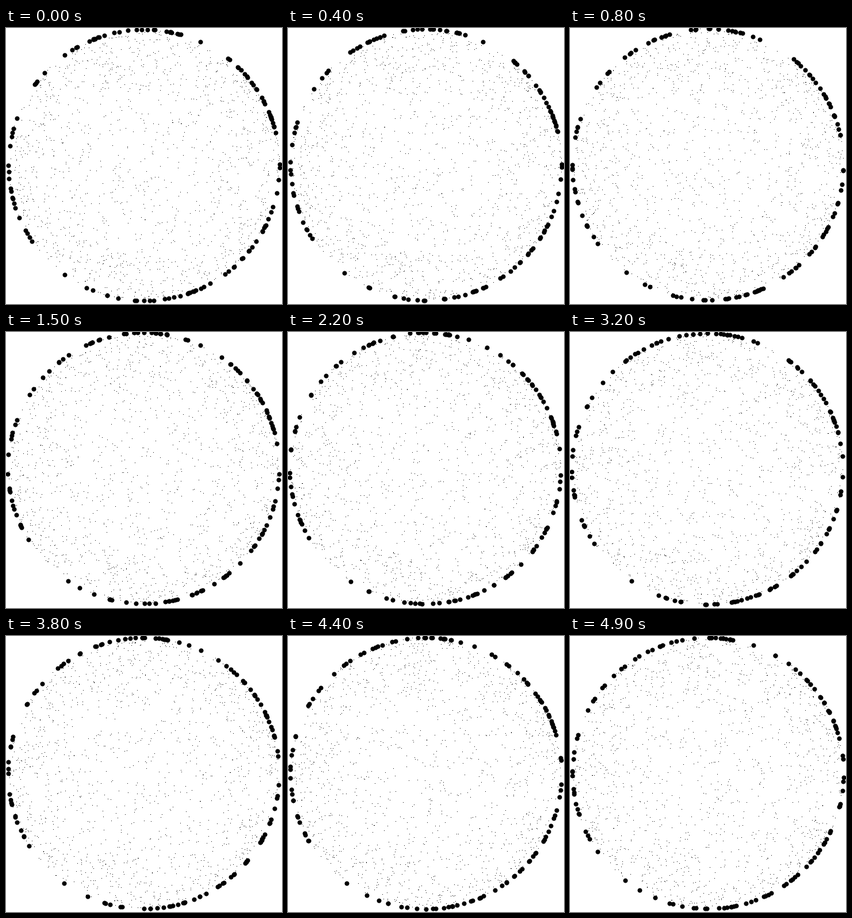
A matplotlib script for the animation above (5000 ms loop, 480x480 px).

```python
import numpy as np
import matplotlib.pyplot as plt
from matplotlib.animation import FuncAnimation

SIZE, DPI = 480, 72
FRAMES, INTERVAL = 50, 100
RADIUS = 235.8
RIM_DOTS, SPECKS = 125, 1400
RIM_STEP = 1.1      # degrees per frame
SPECK_STEP = 0.016  # fraction of the radius per frame
CROWDING = 2.0      # extra speck density towards the rim

rng = np.random.default_rng(12)


def center(frame):
    """The whole ring drifts by about a pixel during a loop."""
    phase = 2 * np.pi * frame / FRAMES
    return np.array([239.3 + 0.8 * np.cos(phase),
                     237.7 - 1.1 * np.sin(phase - 0.6)])


def on_circle(angles, radii):
    """Offsets from the centre for angles (radians) and relative radii."""
    offsets = np.stack([np.cos(angles), np.sin(angles)], axis=-1)
    return RADIUS * radii[..., None] * offsets


def rim_walk():
    start = rng.uniform(0, 360, RIM_DOTS)
    steps = rng.normal(0, RIM_STEP, (FRAMES, RIM_DOTS))
    angles = np.radians(start + np.cumsum(steps, axis=0))
    return on_circle(angles, np.ones_like(angles))


def speck_walk():
    angle = rng.uniform(0, 2 * np.pi, SPECKS)
    points = np.sqrt(rng.random(SPECKS)) * np.exp(1j * angle)
    track = []
    for _ in range(FRAMES):
        track.append(points)
        dx, dy = rng.normal(0, SPECK_STEP, (2, SPECKS))
        points = points + dx + 1j * dy
        reach = np.abs(points)
        points = np.where(reach > 1, points * (2 - reach) / reach, points)
    track = np.array(track)

    # Map the even disc to one that thickens towards the rim
    radii = np.linspace(0, 1, 400)
    share = (radii**2 + CROWDING / 3 * radii**6) / (1 + CROWDING / 3)
    return on_circle(np.angle(track), np.interp(np.abs(track)**2, share, radii))


rim = rim_walk()
specks = speck_walk()

fig = plt.figure(figsize=(SIZE / DPI, SIZE / DPI), dpi=DPI, facecolor="white")
ax = fig.add_axes([0, 0, 1, 1])
ax.set(xlim=(0, SIZE), ylim=(SIZE, 0))
ax.axis("off")
speck_dots, = ax.plot([], [], ",", color="black", antialiased=False)
rim_dots, = ax.plot([], [], "o", color="black", markersize=8,
                    markeredgewidth=0)


def draw(frame):
    speck_dots.set_data(*(center(frame) + specks[frame]).T)
    rim_dots.set_data(*(center(frame) + rim[frame]).T)
    return speck_dots, rim_dots


animation = FuncAnimation(fig, draw, frames=FRAMES, interval=INTERVAL,
                          repeat=True, repeat_delay=0)
plt.show()
```
